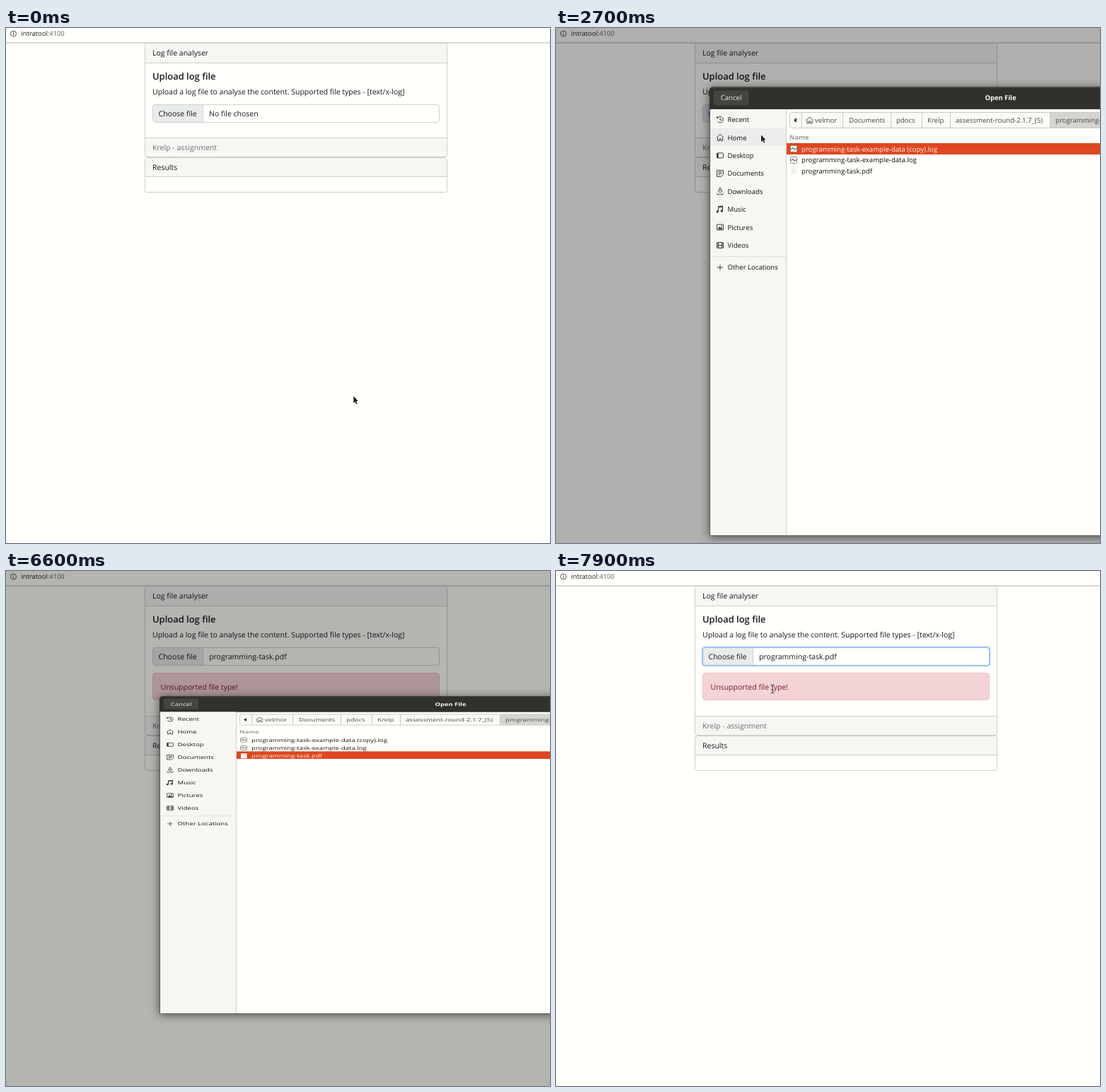
An HTML page with a canvas for the animation above (8 s loop, 769 by 729 pixels).

```html
<!DOCTYPE html>
<html lang="en">
<head>
<meta charset="utf-8">
<title>Log file analyser</title>
<style>
html, body { margin: 0; width: 100%; height: 100%; overflow: hidden; background: #fffffb; }
canvas { display: block; width: 769px; height: 729px; }
</style>
</head>
<body>
<canvas id="stage"></canvas>
<script>
const W = 769, H = 729, LOOP = 8000, STEP = 100;
const PAPER = '#fffffb', LINE = '#cececb', INK = '#17191c';
const FONT = '"Open Sans", "Noto Sans", sans-serif';
const WEB = 10.52, UI = 9.6;
const SELECT = '#de4721';

const canvas = document.getElementById('stage');
const ctx = canvas.getContext('2d');
const dpr = window.devicePixelRatio || 1;
canvas.width = W * dpr;
canvas.height = H * dpr;

// time, x, y of the pointer tip
const PATH = [
  [0, 491, 520], [100, 491, 516], [200, 491, 516], [300, 504, 507], [500, 504, 507],
  [900, 240, 150], [1000, 212, 115], [1100, 227, 119], [1400, 227, 119], [1600, 232, 123],
  [2600, 232, 123], [3000, 463, 232], [3100, 463, 232], [3600, 438, 128], [3800, 466, 184],
  [4000, 452, 204], [4100, 452, 204], [4300, 418, 203], [4500, 440, 205], [5500, 440, 205],
  [5900, 775, 152], [6900, 775, 110], [7400, 266, 170], [7600, 266, 170],
  [7700, 250, 167], [7800, 250, 167], [7900, 306, 167]
];

const SIDE = ['Recent', 'Home', 'Desktop', 'Documents', 'Downloads', 'Music', 'Pictures', 'Videos'];
const FILES = ['programming-task-example-data (copy).log', 'programming-task-example-data.log', 'programming-task.pdf'];
// left edge of the tab, text x, label
const CRUMBS = [
  [347, 366, 'velmor'], [405, 414, 'Documents'], [473, 481, 'pdocs'], [517, 525, 'Krelp'],
  [557, 565, 'assessment-round-2.1.7_(5)'], [698, 706, 'programming-task']
];

const clamp = v => Math.max(0, Math.min(1, v));

function pointer(t) {
  let i = PATH.length - 1;
  while (PATH[i][0] > t) i--;
  const a = PATH[i], b = PATH[i + 1] || a;
  const k = b === a ? 0 : (t - a[0]) / (b[0] - a[0]);
  return { x: a[1] + (b[1] - a[1]) * k, y: a[2] + (b[2] - a[2]) * k };
}

function text(str, x, mid, size = WEB, color = INK, weight = 400, align = 'left') {
  ctx.font = `${weight} ${size}px ${FONT}`;
  ctx.textAlign = align;
  ctx.fillStyle = color;
  ctx.fillText(str, x, mid + size * 0.36);
}

function rect(x, y, w, h, color) {
  ctx.fillStyle = color;
  ctx.fillRect(x, y, w, h);
}

function box(x, y, w, h, r, fill, stroke) {
  ctx.beginPath();
  ctx.roundRect(x, y, w, h, r);
  if (fill) { ctx.fillStyle = fill; ctx.fill(); }
  if (stroke) { ctx.strokeStyle = stroke; ctx.lineWidth = 1; ctx.stroke(); }
}

function poly(points, fill, stroke, width = 1, close = true) {
  ctx.beginPath();
  points.forEach(([x, y]) => ctx.lineTo(x, y));
  if (close) ctx.closePath();
  if (stroke) { ctx.strokeStyle = stroke; ctx.lineWidth = width; ctx.stroke(); }
  if (fill) { ctx.fillStyle = fill; ctx.fill(); }
}

function ring(x, y, r, color, from = 0, to = Math.PI * 2) {
  ctx.beginPath();
  ctx.arc(x, y, r, from, to);
  ctx.strokeStyle = color;
  ctx.lineWidth = 1;
  ctx.stroke();
}

function drawBar() {
  ring(10.5, 8, 4, '#555');
  rect(10, 7.3, 1, 3, '#444');
  rect(10, 5.3, 1, 1.1, '#444');
  const host = 'intratool';
  text(host, 21.5, 8, 9.4, '#1c1c1c');
  const end = 21.5 + ctx.measureText(host).width;
  text(':4100', end, 8, 9.4, '#606060');
  rect(0, 20, W, 1, '#d9d9d6');
  rect(0, 21, W, 1, '#d6d6d3');
}

function drawInput(file, focus, button) {
  if (focus) box(205.5, 106.5, 409, 29, 5, '#bcd6f8');
  box(207.5, 108.5, 405, 25, 3.5, PAPER);
  box(208, 109, 70, 24, [3, 0, 0, 3], button);
  rect(278, 109, 1, 24, '#d0d4d5');
  box(207.5, 108.5, 405, 25, 3.5, null, focus ? '#8ab6ee' : '#ced2d5');
  text('Choose file', 215.5, 121);
  text(file, 287, 121);
}

function drawPage(t) {
  const done = t >= 6600;
  const shift = done ? 50 : 0;
  rect(0, 0, W, H, PAPER);
  drawBar();

  box(197, 22, 426, 27, [3, 3, 0, 0], '#f6f6f3');
  rect(197, 49, 426, 1, LINE);
  box(197, 156 + shift, 426, 27, [0, 0, 3, 3], '#f6f6f3');
  rect(197, 155 + shift, 426, 1, LINE);
  box(196.5, 21.5, 427, 161 + shift, 3, null, LINE);
  text('Log file analyser', 207, 35.5);
  text('Upload log file', 207, 68, 12.95, INK, 600);
  text('Upload a log file to analyse the content. Supported file types - [text/x-log]', 207, 90);
  text('Krelp - assignment', 207, 169 + shift, WEB, '#6b6f73');

  const waiting = t >= 2000 && !done;
  const button = !waiting ? '#e8ebea' : t < 2500 ? '#cbd8e2' : '#e6e7ee';
  drawInput(done ? FILES[2] : 'No file chosen', t >= 6700, button);
  if (done) {
    box(207.5, 144.5, 405, 38, 3.5, '#f4d3d7', '#efc3c8');
    text('Unsupported file type!', 218.5, 164, WEB, '#741c26');
  }

  box(197, 184 + shift, 426, 27, [3, 3, 0, 0], '#f6f6f3');
  rect(197, 210 + shift, 426, 1, LINE);
  box(196.5, 183.5 + shift, 427, 49, 3, null, LINE);
  text('Results', 207, 197 + shift);
}

function houseIcon(x, y, c) {
  poly([[x - 5, y], [x, y - 4.5], [x + 5, y]], null, c, 1, false);
  poly([[x - 3.5, y], [x - 3.5, y + 4.5], [x - 1, y + 4.5], [x - 1, y + 1.5], [x + 1, y + 1.5],
    [x + 1, y + 4.5], [x + 3.5, y + 4.5], [x + 3.5, y]], null, c, 1, false);
}

function fileIcon(y, isLog, selected) {
  if (isLog) {
    box(331.5, y - 4.5, 9, 9, 1, '#f7f7f4', '#8b8b87');
    poly([[332, y], [334, y], [335, y - 2], [337, y + 1.5], [338, y], [340, y]], null, '#444', 0.9, false);
  } else {
    box(332, y - 5, 8.5, 10, 0.5, selected ? '#fdf7f4' : '#f6f6f3');
    if (!selected) for (let i = 0; i < 3; i++) rect(333, y - 3 + i * 2, i ? 6 : 4, 0.7, '#dcdcd9');
  }
}

const sideIcons = [
  (x, y, c) => {
    ring(x, y, 4.3, c, -2.4, 2.6);
    poly([[x, y - 2.5], [x, y + 0.5], [x + 2.5, y + 0.5]], null, c, 1, false);
    poly([[x - 5.5, y - 4], [x - 1.8, y - 3.8], [x - 4, y - 1]], c);
  },
  houseIcon,
  (x, y, c) => { box(x - 4.5, y - 3.5, 9, 7, 1, null, c); rect(x - 4.5, y - 3.5, 2.2, 7, c); },
  (x, y, c) => {
    poly([[x - 4.5, y - 4.5], [x + 4.5, y - 4.5], [x + 4.5, y + 1.5], [x + 1.5, y + 4.5], [x - 4.5, y + 4.5]], null, c);
    for (let i = 0; i < 3; i++) rect(x - 2.5, y - 2.7 + i * 2, i < 2 ? 5 : 3, 1, c);
  },
  (x, y, c) => {
    poly([[x - 1, y - 5], [x + 1, y - 5], [x + 1, y - 1], [x + 3, y - 1], [x, y + 2.3], [x - 3, y - 1], [x - 1, y - 1]], null, c, 0.9);
    poly([[x - 4, y + 2], [x - 4, y + 4.5], [x + 4, y + 4.5], [x + 4, y + 2]], null, c, 0.9, false);
  },
  (x, y, c) => {
    poly([[x - 2.5, y + 3], [x - 2.5, y - 4], [x + 3.5, y - 4.5], [x + 3.5, y + 2]], null, c, 1.1, false);
    rect(x - 2.5, y - 4.5, 6, 1.8, c);
    for (const [dx, dy] of [[-3.7, 3.2], [2.3, 2.3]]) {
      ctx.beginPath();
      ctx.arc(x + dx, y + dy, 1.7, 0, 7);
      ctx.fillStyle = c;
      ctx.fill();
    }
  },
  (x, y, c) => {
    box(x - 4.5, y - 4, 9, 8, 0.5, null, c);
    poly([[x - 3.5, y + 3], [x - 1, y - 1], [x + 1, y + 1], [x + 2.3, y], [x + 3.5, y + 3]], c);
    rect(x + 1.2, y - 2.5, 1.6, 1.6, c);
  },
  (x, y, c) => {
    box(x - 4.5, y - 4, 9, 8, 0.5, null, c);
    rect(x - 2.8, y - 4, 1, 8, c);
    rect(x + 1.8, y - 4, 1, 8, c);
    rect(x - 2.5, y - 0.5, 5, 1, c);
    for (let i = 0; i < 3; i++) { rect(x - 4.5, y - 2.5 + i * 2, 2, 0.8, c); rect(x + 2.5, y - 2.5 + i * 2, 2, 0.8, c); }
  }
];

function drawSidebar(p) {
  rect(218, 115, 107, 603, '#f6f6f3');
  rect(325, 115, 1, 603, '#cfcfcc');
  SIDE.forEach((name, i) => {
    const y = 129.7 + i * 25.4;
    if (p.x < 325 && Math.abs(p.y - y) < 12.7) rect(218, Math.round(y - 12.7), 107, 25, '#ececea');
    sideIcons[i](232, y, '#3b3b39');
    text(name, 242.5, y, UI, '#121211');
  });
  rect(218, 323, 107, 1, '#dcdcd9');
  rect(228, 338.5, 8, 1, '#3b3b39');
  rect(231.5, 335, 1, 8, '#3b3b39');
  text('Other Locations', 242.5, 339, UI, '#121211');
}

function drawCrumbs() {
  box(330.5, 119.5, 460, 22, 3, '#f9f9f6', '#c8c8c4');
  rect(698, 120, 80, 21, '#d4d4d0');
  poly([[336, 130.5], [340, 127], [340, 134]], '#333');
  houseIcon(358.5, 130.5, '#4a4a47');
  for (const [edge, x, label] of CRUMBS) {
    rect(edge, 120, 1, 21, '#c8c8c4');
    text(label, x, 130.5, UI, '#484845');
  }
}

function drawFiles(t, p) {
  text('Name', 330, 155, 9.2, '#9b9b96', 700);
  const chosen = t >= 5100 ? 2 : 0;
  const hover = p.x > 326 ? Math.floor((p.y - 163) / 15.7) : -1;
  FILES.forEach((name, i) => {
    const on = i === chosen, top = Math.round(163 + i * 15.7), mid = 171.2 + i * 15.7;
    if (on || i === hover) rect(326, top, W - 326, i ? 15 : 16, on ? SELECT : '#e1e2dd');
    fileIcon(Math.round(mid), i < 2, on);
    text(name, 347, mid, UI, on ? '#fff4ee' : '#121211');
  });
}

function drawDialog(t, p, scale) {
  ctx.save();
  ctx.translate(0, 403.6 * (1 - scale));
  ctx.scale(1, scale);
  ctx.save();
  ctx.shadowColor = 'rgba(0,0,0,.6)';
  ctx.shadowBlur = 13 * dpr;
  ctx.shadowOffsetY = 2 * dpr;
  box(217, 83.5, 640, 635, [5, 0, 0, 0], '#55544f');
  ctx.restore();
  rect(218, 115, W, 603, PAPER);
  box(217, 83.5, 640, 31.5, [5, 0, 0, 0], '#30302c');
  rect(221, 84, W, 1, '#484742');
  box(222.5, 88.5, 50, 21, 3, '#444440', '#393935');
  text('Cancel', 247.5, 99, UI, '#eeeeea', 400, 'center');
  text('Open File', 628.5, 99, 9.4, '#fffffb', 700, 'center');
  drawSidebar(p);
  drawCrumbs();
  drawFiles(t, p);
  ctx.restore();
}

function drawPointer(t, { x, y }) {
  if (t >= 7700) {
    const beam = (w, c) => {
      for (const s of [-1, 1]) {
        poly([[x - 2.5, y + s * 6], [x - 1, y + s * 6], [x, y + s * 5], [x + 1, y + s * 6], [x + 2.5, y + s * 6]], null, c, w, false);
      }
      poly([[x, y - 5], [x, y + 5]], null, c, w, false);
      poly([[x - 1.5, y + 1.5], [x + 1.5, y + 1.5]], null, c, w, false);
    };
    beam(2, 'rgba(255,255,255,.6)');
    beam(1, '#33302f');
    return;
  }
  const shape = [[0, 0], [0, 10], [2.2, 8], [3.8, 11.6], [5.3, 10.9], [3.8, 7.4], [6.3, 7]];
  poly(shape.map(([a, b]) => [x + 0.3 + a, y + 1 + b]), '#1c1c1c', 'rgba(255,255,255,.85)', 1.6);
}

function dimAt(t) {
  if (t < 6500) return 0.31 * clamp((t - 2040) / 460);
  return clamp(0.293 - (t - 6600) * 0.001);
}

function dialogScale(t) {
  if (t < 2000 || t >= 6700) return 0;
  if (t < 2100) return 0.6;
  return t < 6600 ? 1 : 0.7074;
}

function draw(t) {
  ctx.setTransform(dpr, 0, 0, dpr, 0, 0);
  ctx.textRendering = 'geometricPrecision';
  const p = pointer(t), scale = dialogScale(t);
  drawPage(t);
  rect(0, 0, W, H, `rgba(0,0,0,${dimAt(t)})`);
  if (scale) drawDialog(t, p, scale);
  drawPointer(t, p);
}

const start = performance.now();
function tick() {
  const t = (performance.now() - start) % LOOP;
  draw(Math.floor(t / STEP) * STEP);
  requestAnimationFrame(tick);
}
tick();
</script>
</body>
</html>
```
